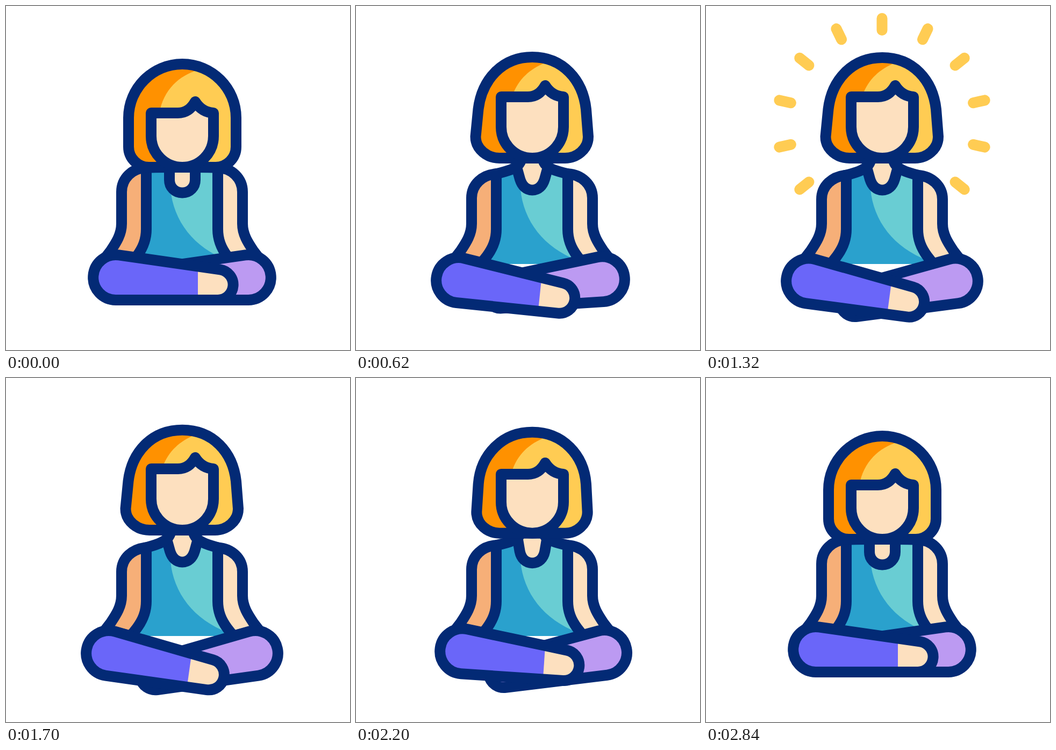
An HTML page for the animation above (3.6 s loop, 640 by 640 pixels).

```html
<!DOCTYPE html>
<html lang="en">
<head>
<meta charset="utf-8">
<title>Meditation</title>
<style>
  html, body { margin: 0; width: 100%; height: 100%; overflow: hidden; background: #fff; }
  svg { display: block; width: 100vw; height: 100vh; }
  .ink { stroke: #032a75; stroke-width: 20; stroke-linecap: round; stroke-linejoin: round; }
  .line { fill: none; }
  .skin { fill: #fde0bf; }
  .shade { fill: #f6af78; }
  #rays { stroke: #ffcc53; stroke-width: 20; stroke-linecap: round; }
</style>
</head>
<body>
<svg viewBox="0 0 640 640">
  <defs>
    <path id="arm"/>
    <path id="shoulder"/>
    <path id="leg" d="M210 463.4 L398.2 490.3 A28.5 28.5 0 0 1 394 547 L204 547 A42 42 0 1 1 210 463.4 Z"/>
    <clipPath id="shirtClip"><path id="shirtEdge"/></clipPath>
    <clipPath id="hairClip"><path id="hairEdge"/></clipPath>
    <clipPath id="legClip"><use href="#leg"/></clipPath>
  </defs>

  <g id="rays"></g>

  <g clip-path="url(#shirtClip)">
    <rect x="220" y="270" width="220" height="220" fill="#2aa1cd"/>
    <path d="M306 270 V340 C311 400 350 450 412 473 H450 V270 Z" fill="#69cdd3"/>
  </g>
  <path id="neck" class="skin"/>
  <path id="collar" class="ink skin"/>
  <use href="#arm" class="ink shade"/>
  <use href="#shoulder" class="ink line"/>
  <g transform="matrix(-1 0 0 1 655 0)">
    <use href="#arm" class="ink skin"/>
    <use href="#shoulder" class="ink line"/>
  </g>

  <g clip-path="url(#hairClip)">
    <rect x="200" y="70" width="260" height="250" fill="#ff9100"/>
    <path id="shine" fill="#ffcc53"/>
  </g>
  <path id="hair" class="ink line"/>
  <path id="face" class="ink skin"/>

  <g transform="matrix(-1 0 0 1 655 0)">
    <g id="rightLeg"><use href="#leg" class="ink" fill="#bc9af2"/></g>
  </g>
  <g id="leftLeg">
    <use href="#leg" fill="#6a66f9"/>
    <rect class="skin" x="357" y="470" width="90" height="90" clip-path="url(#legClip)"/>
    <use href="#leg" class="ink line"/>
  </g>
</svg>

<script>
const LOOP = 3600;
const $ = id => document.getElementById(id);

// Smooth monotone curve through [time, value] keys, flat at both ends.
function track(...keys) {
  const slope = keys.slice(1).map(([t, v], i) => (v - keys[i][1]) / (t - keys[i][0]));
  const tangent = keys.map((_, i) => {
    const a = slope[i - 1] || 0, b = slope[i] || 0;
    return a * b > 0 ? 2 * a * b / (a + b) : 0;
  });
  return t => {
    if (t <= keys[0][0]) return keys[0][1];
    const i = keys.findIndex(k => k[0] > t) - 1;
    if (i < 0) return keys[keys.length - 1][1];
    const [t0, v0] = keys[i], [t1, v1] = keys[i + 1];
    const d = t1 - t0, u = (t - t0) / d, w = 1 - u;
    return w * w * (1 + 2 * u) * v0 + u * u * (3 - 2 * u) * v1
         + d * u * w * (w * tangent[i] - u * tangent[i + 1]);
  };
}

const head = track([120, 0], [620, 1], [1750, 1], [2200, .67], [2460, .37], [2840, 0]);
const crown = track([120, 0], [620, 13], [1320, 12], [1700, 11.3], [2200, 7.2], [2460, 4], [2840, 0]);
const body = track([120, 0], [620, .8], [1320, .98], [1750, 1.03], [2200, .73], [2460, .42], [2840, 0]);
const leftSlide = track([120, 0], [620, 1], [1740, 1], [2200, .46], [2460, .08], [2600, 0]);
const leftTurn = track([120, 0], [620, .74], [1320, .95], [1720, 1], [2200, .48], [2460, .06], [2600, 0]);
const rightSlide = track([360, 0], [620, .54], [880, 1], [1980, 1], [2200, .86], [2460, .36], [2840, 0]);
const rightTurn = track([360, 0], [620, .46], [900, .85], [1320, .93], [1750, 1], [2200, .87], [2460, .4], [2840, 0]);
const rayOuter = track([800, 174], [1180, 195], [1320, 196], [1660, 201]);
const rayInner = track([1240, 173], [1320, 174], [1660, 201]);

// Path between two poses with matching commands.
function mix(a, b, p) {
  const to = b.match(/[\d.]+/g);
  let i = 0;
  return a.replace(/[\d.]+/g, n => (+n + (to[i++] - n) * p).toFixed(2));
}

const SIDE = ' L215 405 C215 425 205 440 195 455 L185 468 L232 480 L243 466 C255 450 261 435 261 415 Z';
const HEM = ' L394 415 C394 435 400 450 412 466 L423 480 L232 480 L243 466 C255 450 261 435 261 415 Z';

const poses = {
  arm: ['M261 301 C235 301 215 321 215 346' + SIDE,
        'M261 315 C235 317 215 335 215 360' + SIDE],
  shoulder: ['M261 301 C275 300 290 300 304 300',
             'M261 315 C280 310 302 304 306 288'],
  shirtEdge: ['M261 301 L304 300 L352 300 L394 301' + HEM,
              'M261 315 L304 299 L352 299 L394 315' + HEM],
  collar: ['M304 300 L304 323.5 C304 337 314 347.5 328 347.5 C342 347.5 352 337 352 323.5 L352 300',
           'M300 304 L305 322 C309 335 317 342.5 328 342.5 C339 342.5 347 335 351 322 L356 304'],
  neck: ['M304 285 L304 310 L352 310 L352 285 Z',
         'M306 280 L300 306 L356 306 L350 280 Z'],
  face: ['M270 199 L320 199 C336 199 346 189 352 178 C360 191 371 198 386 199 L386 242 C386 274 360 300 328 300 C296 300 270 274 270 242 Z',
         'M270 169 L320 169 C336 169 346 159 352 148 C360 161 371 168 386 169 L386 225 C386 257 360 283 328 283 C296 283 270 257 270 225 Z'],
  shine: ['M357 119 C322 130 293 155 285 200 L285 310 L450 310 L450 90 Z',
          'M351 106 C323 118 303 135 291 166 L291 293 L450 293 L450 60 Z']
};

const hairRest = 'M228 208 C228 153 273 108 328 108 C383 108 428 153 428 208 L428 262 C428 283 411 300 390 300 L266 300 C245 300 228 283 228 262 Z';
const hairUp = top =>
  `M227.5 192 C234 138 271 ${top} 328 ${top} C385 ${top} 422 138 428 192 L432 243 C432 267 410 283 389 283 L267 283 C245 283 222.5 267 222.5 243 Z`;

function poseLeg(id, slide, turn) {
  $(id).setAttribute('transform', `translate(${-13 * slide} ${7 * turn}) rotate(${8 * turn} 204 505)`);
}

const rays = [];
for (let i = -5; i <= 5; i++) {
  const ray = document.createElementNS('http://www.w3.org/2000/svg', 'line');
  ray.setAttribute('transform', `translate(327.5 219) rotate(${i * 360 / 14})`);
  $('rays').append(ray);
  rays.push(ray);
}

function draw(t) {
  const up = head(t), sink = body(t);
  for (const id in poses) {
    const p = id === 'face' || id === 'shine' || id === 'neck' || id === 'collar' ? up : sink;
    $(id).setAttribute('d', mix(...poses[id], p));
  }

  // The crown settles on its own while the rest of the hair follows the head.
  const top = up > .001 ? 108 - crown(t) / up : 96;
  const hair = mix(hairRest, hairUp(top), up);
  $('hair').setAttribute('d', hair);
  $('hairEdge').setAttribute('d', hair);

  poseLeg('leftLeg', leftSlide(t), leftTurn(t));
  poseLeg('rightLeg', rightSlide(t), rightTurn(t));

  $('rays').style.display = t > 800 && t < 1660 ? '' : 'none';
  for (const ray of rays) {
    ray.setAttribute('y1', -rayInner(t));
    ray.setAttribute('y2', -rayOuter(t));
  }
}

function frame() {
  draw(performance.now() % LOOP);
  requestAnimationFrame(frame);
}
frame();
</script>
</body>
</html>
```
